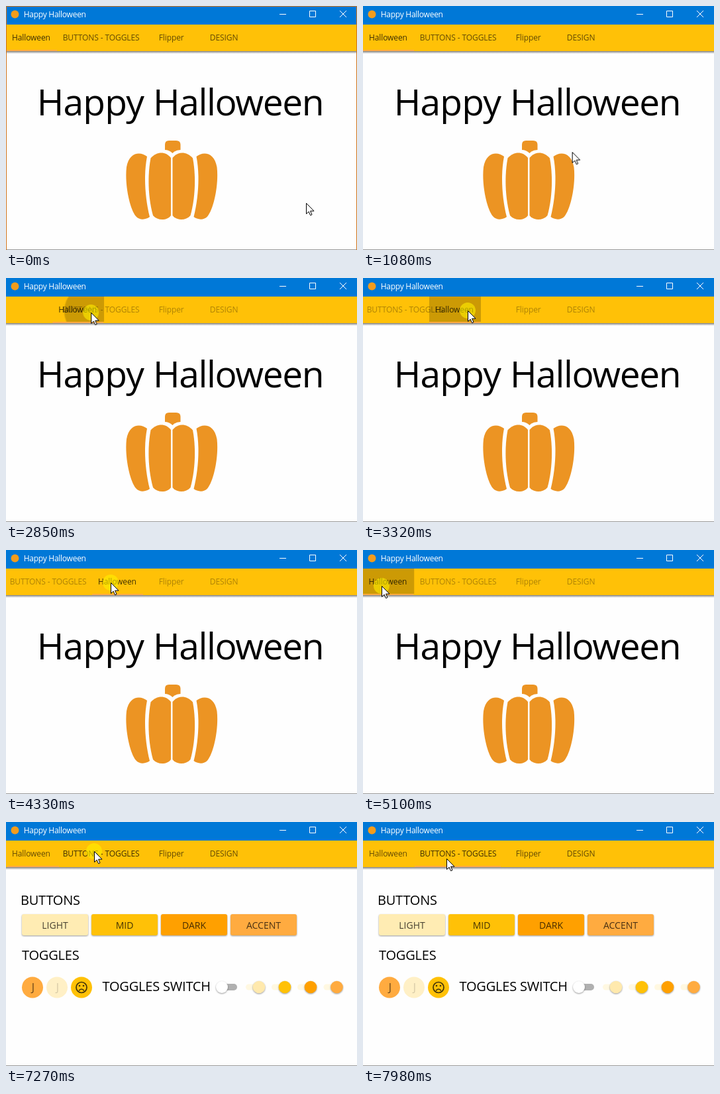
These frames come from a looping animation (530x368 px, 8000 ms). An HTML page:

```html
<!DOCTYPE html>
<html lang="en">
<head>
<meta charset="utf-8">
<title>Happy Halloween</title>
<style>
html, body { margin: 0; width: 100%; height: 100%; overflow: hidden; background: #fff; }
svg { display: block; width: 530px; height: 368px; font-family: "Open Sans", "Noto Sans", sans-serif; }

.move, .flip { animation-duration: 8s; animation-iteration-count: infinite; }
.move { animation-timing-function: linear; }
.flip { animation-timing-function: step-end; }

.title { font-size: 55px; }
.tab { font-size: 12px; letter-spacing: -.1px; fill-opacity: .62; }
.head { font-size: 20px; letter-spacing: -.2px; }
.label { font-size: 14px; text-anchor: middle; fill-opacity: .72; }
.lift { filter: drop-shadow(0 1px 1.2px rgba(0, 0, 0, .4)); }
.ripple { fill: #000; fill-opacity: .2; }

.border { animation-name: border; }
.first { animation-name: first; }
.second { animation-name: second; }
.glow { animation-name: glow; }
.dim { animation-name: dim; }
.dim2 { animation-name: dim2; }
.chosen { animation-name: chosen; }
.cursor { animation-name: cursor; }
.drag { animation-name: drag; }
.swap { animation-name: swap; }
.line { animation-name: line; }
.r1 { animation-name: r1; }
.r2 { animation-name: r2; }
.r3 { animation-name: r3; }

@keyframes border { 0% { opacity: 1 } .87%, 100% { opacity: 0 } }
@keyframes first { 0% { visibility: visible } 90.87%, 100% { visibility: hidden } }
@keyframes second { 0% { visibility: hidden } 90.87%, 100% { visibility: visible } }
@keyframes glow {
  0% { opacity: 0 } 30.87% { opacity: 1 } 45.25% { opacity: 0 }
  53.12% { opacity: 1 } 65.62% { opacity: 0 }
  90.87% { opacity: 1 } 93.2%, 100% { opacity: 0 }
}
@keyframes dim {
  0% { fill-opacity: .62 } 30.87% { fill-opacity: .32 } 45.25% { fill-opacity: .62 }
  53.12% { fill-opacity: .32 } 65.62%, 100% { fill-opacity: .62 }
}
@keyframes dim2 {
  0% { fill-opacity: .62 } 30.87% { fill-opacity: .32 } 45.25% { fill-opacity: .62 }
  53.12% { fill-opacity: .32 } 65.62% { fill-opacity: .62 } 90.87%, 100% { fill-opacity: .76 }
}
@keyframes chosen { 0% { fill-opacity: .76 } 90.87%, 100% { fill-opacity: .62 } }

@keyframes cursor {
  0%, 9.7% { transform: translate(453px, 297px) }
  15% { transform: translate(262px, 190px) }
  20.1% { transform: translate(97px, 71px) }
  24.1%, 31% { transform: translate(58px, 52px) }
  35.6% { transform: translate(128px, 52px) }
  41.5%, 54.2% { transform: translate(158px, 49px) }
  62.7%, 65.8% { transform: translate(28px, 54px) }
  71.5%, 75.3% { transform: translate(251px, 259px) }
  80.1% { transform: translate(132px, 82px) }
  83.7% { transform: translate(75px, 52px) }
  85.9% { transform: translate(84px, 47px) }
  88.7%, 98.7% { transform: translate(133px, 44px) }
  99.7%, 100% { transform: translate(126px, 55px) }
}
@keyframes drag {
  0%, 31% { transform: translateX(0) }
  35.6% { transform: translateX(70px) }
  41.5%, 45.24% { transform: translateX(100px) }
  45.25%, 54.2% { transform: translateX(130px) }
  62.7% { transform: translateX(-3px) }
  63.7%, 65.6% { transform: translateX(-.5px) }
  65.62%, 100% { transform: translateX(0) }
}
@keyframes swap {
  0%, 36.7% { transform: translateX(0) }
  39.5%, 58% { transform: translateX(-80px) }
  61%, 100% { transform: translateX(0) }
}
@keyframes line {
  0%, 90.8% { x: 0; width: 77px }
  94.5%, 100% { x: 78px; width: 130px }
}
@keyframes r1 {
  0%, 31.8% { transform: scale(0); opacity: 1 }
  35.6% { transform: scale(40); opacity: 1 }
  39.4%, 49.2% { transform: scale(80); opacity: 1 }
  51.2%, 100% { transform: scale(80); opacity: 0 }
}
@keyframes r2 {
  0%, 54.6% { transform: scale(0); opacity: 1 }
  61%, 65.6% { transform: scale(70); opacity: 1 }
  68.2%, 100% { transform: scale(70); opacity: 0 }
}
@keyframes r3 {
  0%, 90.8% { transform: scale(0); opacity: 1 }
  94.3% { transform: scale(85); opacity: 1 }
  97.6%, 100% { transform: scale(85); opacity: 0 }
}
</style>
</head>
<body>
<svg viewBox="0 0 530 368">
  <defs>
    <linearGradient id="shade" x2="0" y2="1">
      <stop stop-opacity=".5"/><stop offset="1" stop-opacity="0"/>
    </linearGradient>
    <clipPath id="tabA"><rect y="28" width="77.5" height="38"/></clipPath>
    <clipPath id="tabB"><rect x="77" y="28" width="131" height="38"/></clipPath>
    <g id="half">
      <path d="M213 227C203 219 186 220 182 243C179 270 187 306 196 317C202 324 212 322 217 318C210 290 207.500 255 213 227Z"/>
      <path d="M249 229C241 219 228 219 218.500 229.500C213.500 255 214.500 290 222 316C229 324 243 324 249 316Z"/>
    </g>
    <rect id="button" y="139" width="100" height="32" rx="3"/>
    <g id="switch">
      <rect x="-20" y="244.500" width="24" height="9" rx="4.500" fill="#fff8e1"/>
      <circle class="lift" cy="249" r="9.300"/>
    </g>
  </defs>

  <rect width="530" height="368" fill="#fefefe"/>

  <g class="flip first">
    <g class="title">
      <text x="46.700" y="164.500" letter-spacing="-.75">Happy</text>
      <text x="222" y="164.500" letter-spacing="-1.35">Halloween</text>
    </g>
    <g fill="#ec9423">
      <path d="M240 217V209Q240 203 246 203H257Q263.500 203 263.500 209V217Q256 217 251.500 222Q246 217 240 217Z"/>
      <use href="#half"/>
      <use href="#half" transform="translate(500.500) scale(-1 1)"/>
    </g>
  </g>

  <g class="flip second">
    <text class="head" x="22" y="125">BUTTONS</text>
    <text class="head" x="24" y="208">TOGGLES</text>
    <text class="head" x="145.500" y="255">TOGGLES SWITCH</text>
    <g class="lift">
      <use href="#button" x="24" fill="#ffecb3"/>
      <use href="#button" x="129" fill="#ffc107"/>
      <use href="#button" x="234" fill="#ffa000"/>
      <use href="#button" x="339" fill="#ffab40"/>
    </g>
    <g class="label">
      <text x="74" y="161">LIGHT</text>
      <text x="179" y="161">MID</text>
      <text x="284" y="161">DARK</text>
      <text x="389" y="161">ACCENT</text>
    </g>
    <circle cx="40" cy="249.500" r="16" fill="#ffab40"/>
    <circle cx="77" cy="249.500" r="16" fill="#fff0c6"/>
    <circle cx="114" cy="249.500" r="16" fill="#ffc107"/>
    <g font-size="16" text-anchor="middle">
      <text x="41" y="255" fill-opacity=".6">J</text>
      <text x="78" y="255" fill-opacity=".16">J</text>
    </g>
    <g fill="none" stroke="#40330c" stroke-width="1.700">
      <circle cx="114" cy="249.500" r="8"/>
      <path d="M110 254.500Q114 249.500 118 254.500"/>
    </g>
    <g fill="#40330c">
      <circle cx="111" cy="247" r="1.300"/><circle cx="117" cy="247" r="1.300"/>
    </g>
    <rect x="322" y="244" width="27" height="10" rx="5" fill="#b0b0b0"/>
    <circle class="lift" cx="326" cy="249" r="9" fill="#fff"/>
    <use href="#switch" x="382" fill="#ffe9ad"/>
    <use href="#switch" x="421" fill="#ffc107"/>
    <use href="#switch" x="460" fill="#ffa000"/>
    <use href="#switch" x="499.500" fill="#ffab40"/>
  </g>

  <rect y="28" width="530" height="40" fill="#ffc107"/>
  <rect y="68" width="530" height="4" fill="url(#shade)"/>

  <g class="tab">
    <g class="move swap">
      <text class="flip dim2" x="85.700" y="52">BUTTONS - TOGGLES</text>
      <g clip-path="url(#tabB)"><g transform="translate(133 47)"><circle class="ripple move r3" r="1"/></g></g>
    </g>
    <text class="flip dim" x="230.700" y="52">Flipper</text>
    <text class="flip dim" x="307.800" y="52">DESIGN</text>
    <g class="move drag">
      <text class="flip chosen" x="9" y="52">Halloween</text>
      <g clip-path="url(#tabA)">
        <g transform="translate(58 50)"><circle class="ripple move r1" r="1"/></g>
        <g transform="translate(28 50)"><circle class="ripple move r2" r="1"/></g>
      </g>
      <rect class="move line" y="66" width="77" height="2" fill="#ffab40" fill-opacity="1"/>
    </g>
  </g>

  <rect width="530" height="28" fill="#0078d7"/>
  <circle cx="13.500" cy="12.500" r="6" fill="#f39c1c"/>
  <text x="26.700" y="17" font-size="12" letter-spacing="-.26" fill="#fff">Happy Halloween</text>
  <path d="M413 12.500H423M458.500 7.500H467.500V16.500H458.500ZM504 7L514 17M514 7L504 17" fill="none" stroke="#fff"/>

  <path d="M0 367.500H530" stroke="#999"/>
  <path class="flip border" d="M.5 368V.5H529.500V368" fill="none" stroke="#d0731a"/>

  <g class="move cursor">
    <circle class="flip glow" r="12" fill="#fff000" fill-opacity=".6"/>
    <path d="M.5 .5V16.500L4.200 13.200L6.600 18.700L9 17.700L6.600 12.200H12Z" fill="#fff" stroke="#000"/>
  </g>
</svg>
</body>
</html>
```
